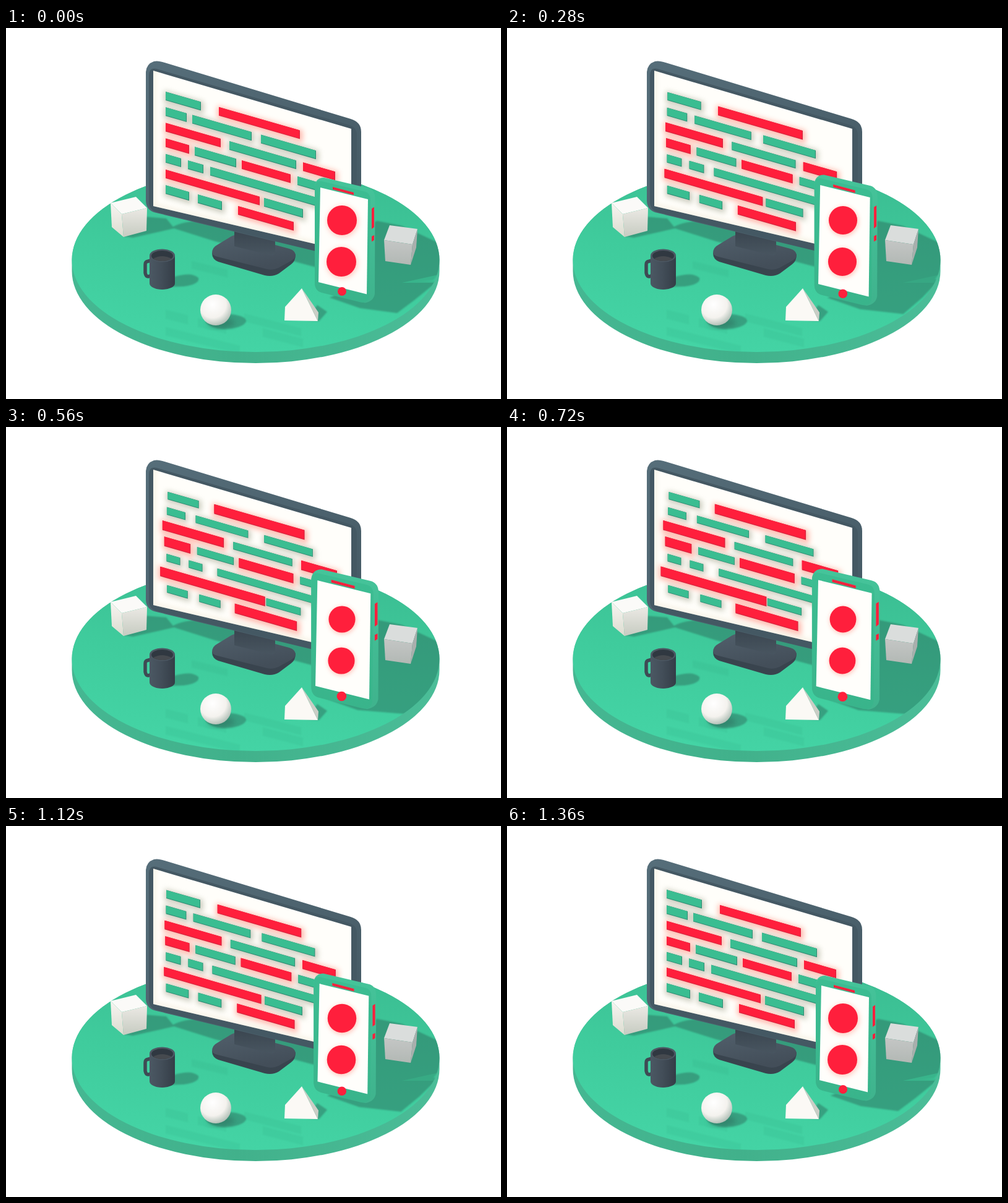
Recreate the animation shown at these times as an HTML page. Size 800 px wide and 600 px high, loop 1.4 s.

```html
<!DOCTYPE html>
<html lang="en">
<head>
<meta charset="utf-8">
<title>Desk with screen and phone</title>
<style>
html, body { margin: 0; width: 100%; height: 100%; overflow: hidden; background: #fff; }
svg { display: block; width: 100vw; height: 100vh; }
</style>
</head>
<body>
<svg viewBox="0 0 800 600" xmlns="http://www.w3.org/2000/svg">
  <defs>
    <linearGradient id="top" x1=".65" y1="0" x2=".4" y2="1">
      <stop offset="0" stop-color="#3bbd92"/><stop offset=".5" stop-color="#3fcb9c"/><stop offset="1" stop-color="#44d4a5"/>
    </linearGradient>
    <linearGradient id="rim">
      <stop offset="0" stop-color="#45b792"/><stop offset=".45" stop-color="#41b18b"/><stop offset="1" stop-color="#4bbd98"/>
    </linearGradient>
    <linearGradient id="shell" x1="0" y1="0" x2="1" y2="1">
      <stop offset="0" stop-color="#566e7a"/><stop offset="1" stop-color="#435762"/>
    </linearGradient>
    <linearGradient id="mug">
      <stop offset="0" stop-color="#4b5863"/><stop offset=".45" stop-color="#434e59"/><stop offset="1" stop-color="#343d47"/>
    </linearGradient>
    <linearGradient id="foot" x1="0" y1="0" x2=".4" y2="1">
      <stop offset="0" stop-color="#515f6b"/><stop offset="1" stop-color="#434e59"/>
    </linearGradient>
    <linearGradient id="neck" x1="0" y1="0" x2="0" y2="1">
      <stop offset="0" stop-color="#3a454f"/><stop offset="1" stop-color="#485560"/>
    </linearGradient>
    <linearGradient id="case" x1="0" y1="0" x2="0" y2="1">
      <stop offset="0" stop-color="#3cbd92"/><stop offset="1" stop-color="#39b48b"/>
    </linearGradient>
    <linearGradient id="side" x1="0" y1="0" x2="0" y2="1">
      <stop offset="0" stop-color="#45c49a"/><stop offset="1" stop-color="#3fb38d"/>
    </linearGradient>
    <linearGradient id="lit" x1="0" y1="0" x2="0" y2="1">
      <stop offset="0" stop-color="#f7f5f1"/><stop offset="1" stop-color="#dcdcd0"/>
    </linearGradient>
    <linearGradient id="face" x1="0" y1="0" x2="0" y2="1">
      <stop offset="0" stop-color="#ebe9e4"/><stop offset="1" stop-color="#c6cbc1"/>
    </linearGradient>
    <linearGradient id="dim" x1="0" y1="0" x2="0" y2="1">
      <stop offset="0" stop-color="#c4c6c5"/><stop offset="1" stop-color="#b2b8b4"/>
    </linearGradient>
    <radialGradient id="ball" cx=".4" cy=".32" r=".75">
      <stop offset="0" stop-color="#fff"/><stop offset=".58" stop-color="#f4f2ee"/><stop offset="1" stop-color="#a3b5ab"/>
    </radialGradient>
    <filter id="soft" x="-20%" y="-20%" width="140%" height="140%"><feGaussianBlur stdDeviation="4"/></filter>
    <filter id="fuzz" x="-20%" y="-20%" width="140%" height="140%"><feGaussianBlur stdDeviation="1"/></filter>
    <clipPath id="table"><ellipse cx="403.5" cy="375" rx="297" ry="149"/></clipPath>
    <clipPath id="glass"><path d="M238 69L558 163V363L238 288Z"/></clipPath>
  </defs>

  <path fill="url(#rim)" d="M106.500 375A297 149 0 0 1 700.500 375V393A297 149 0 0 1 106.500 393Z"/>
  <ellipse cx="403.5" cy="375" rx="297" ry="149" fill="url(#top)"/>

  <g clip-path="url(#table)">
    <g fill="#28916f" opacity=".09" filter="url(#fuzz)">
      <path d="M258 456l36 9v14l-36-9ZM258 484l120 30v13l-120-30ZM310 470l46 11v13l-46-11ZM385 462l92 24v12l-92-24ZM415 486l65 17v13l-65-17ZM300 377l58 14v12l-58-14Z"/>
    </g>
    <g fill="#2b5f52" opacity=".42" filter="url(#fuzz)">
      <path d="M222 305L259 308L272 324L205 339L190 337Z"/>
      <path d="M268 323Q280 314 310 312L372 322L500 352L600 312L640 320L700 348L710 385L690 408L640 412L597 405L505 388L430 368L338 345Z"/>
      <path id="cast"/>
      <path d="M258 419L273 402Q300 394 311 404Q314 414 287 418Z"/>
      <path d="M322 475Q340 462 365 463Q389 466 388 475Q382 486 352 487Q330 486 322 475Z"/>
      <path d="M486 473L503 448L519 459L506 474Z"/>
    </g>
    <path id="gap" fill="#3bc394" d="M640 412L703 398L700 412Z"/>
    <ellipse cx="348" cy="477" rx="22" ry="8" fill="#2b5f52" opacity=".4" filter="url(#soft)"/>
  </g>

  <!-- cubes -->
  <path fill="#fbfaf8" d="M169 283L210 273L228 291L187 301Z"/>
  <path fill="url(#lit)" d="M169 283L187 301L190 338L171 322Z"/>
  <path fill="url(#face)" d="M187 301L228 291L227 328L190 338Z"/>
  <path fill="#dadddc" d="M620 319L665 325L657 350L611 343Z"/>
  <path fill="url(#dim)" d="M611 343L657 350L654 383L613 377Z"/>
  <path fill="#a9afad" d="M657 350L665 325L663 355L654 383Z"/>

  <!-- stand and monitor -->
  <path fill="#39444e" d="M333 364Q333 374 343 378L418 400Q431 403 441 397L461 382Q468 377 468 366L400 352Z"/>
  <path fill="url(#foot)" d="M333 364Q333 355 341 351L364 337Q371 333 380 336L458 357Q468 360 468 368Q467 373 460 377L440 388Q430 393 418 389L342 370Q334 368 333 364Z"/>
  <path fill="url(#neck)" d="M369 327L435 343V365Q433 369 425 367L369 353Z"/>
  <path fill="url(#shell)" d="M226 71Q227 58 239 54Q245 52.500 253 55L557 147Q574 152 574 168V372Q572 379 563 376L241 298.500Q227 295 226 280Z"/>
  <path fill="#445863" d="M231 77Q231 63 243 66L555 157Q567 161 567 173V370Q566 376 557 374L244 298Q231 294 231 281Z"/>
  <path fill="#fffefa" d="M238 69L558 163V363L238 288Z"/>
  <g clip-path="url(#glass)">
    <path fill="none" stroke="#e8dcc0" stroke-width="6" opacity=".45" filter="url(#soft)" d="M250 60L238 69V288L558 363"/>
    <g id="glow" filter="url(#soft)" opacity=".5"></g>
    <g id="bars"></g>
  </g>

  <!-- mug -->
  <path fill="none" stroke="#3f4a54" stroke-width="5.500" stroke-linejoin="round" d="M234 376L227 378Q225 379 225 383V396Q226 402 230 402L235 400"/>
  <path fill="url(#mug)" d="M232 368V413A20.500 10 0 0 0 273 413V368Z"/>
  <ellipse cx="252.500" cy="368" rx="20.500" ry="10.500" fill="#4c5863"/>
  <ellipse cx="252.500" cy="368.500" rx="17.500" ry="8.500" fill="#303841"/>
  <path fill="#464a4f" d="M238 373Q252 365 268 373Q262 377 252 377Q243 377 238 373Z"/>

  <circle cx="339" cy="456" r="25" fill="url(#ball)"/>

  <path fill="#fbf9f5" d="M478 421L451 451L450 473L504 474Z"/>
  <path fill="#cbcec6" d="M478 421L505 460L504 474Z"/>

  <g id="phone">
    <path fill="url(#side)" d="M499 255Q501 242 514 242L584 258.500Q596 261 596.500 275L596 430Q594 442 580 444.500L510 427Q499 424 499 412Z"/>
    <path fill="url(#case)" d="M499 257Q500 245 511 248L580 264.500Q589 267 589 278L587.500 433Q586 446 573 443.500L510 428Q499 425 499 412Z"/>
    <path fill="#fffefb" d="M508 258L585 277L583 430.500L505 411Z"/>
    <path fill="#ff1f3c" d="M528 257L562 266V270L528 261Z"/>
    <path fill="none" stroke="#b93548" stroke-width="1" stroke-dasharray="2 3" d="M531 260L560 267.500"/>
    <path fill="#ff1f3c" d="M591 292L595 289.500V322L591 325ZM591 337L595 335V343L591 345.500Z"/>
    <circle cx="543" cy="426" r="7" fill="#ff1f3c"/>
  </g>
  <g id="badges"></g>
</svg>
<script>
const NS = "http://www.w3.org/2000/svg", STEP = 40, FRAMES = 35;
const RED = ["#ff1f3c", "#d3233f", "#ff7a66"], GREEN = ["#3abd91", "#2f8d74", "#9a9c84"];
const SLOPE = 0.288, GROW = 0.125;
const $ = id => document.getElementById(id);

function add(parent, tag, attrs) {
  const el = document.createElementNS(NS, tag);
  for (const k in attrs) el.setAttribute(k, attrs[k]);
  return parent.appendChild(el);
}

// [start, end, red?] per bar, one array per line of code
const rows = [
  [[258, 315], [344, 475, 1]],
  [[258, 292], [301, 397], [412, 501]],
  [[258, 347, 1], [361, 469], [480, 532, 1]],
  [[258, 296, 1], [305, 372], [381, 460, 1], [471, 547]],
  [[258, 283], [294, 319], [330, 530]],
  [[258, 410, 1], [417, 480]],
  [[258, 296], [310, 349], [375, 465, 1]]
];
const movers = [];
const shape = (w, h, dx, dy) => {
  const k = w * SLOPE / 2;
  return `M${-w / 2 + dx} ${-k - h / 2 + dy}L${w / 2 + dx} ${k - h / 2 + dy}v${h}L${-w / 2 + dx} ${-k + h / 2 + dy}Z`;
};

rows.forEach((row, i) => row.forEach(([a, b, red]) => {
  const [fill, edge, halo] = red ? RED : GREEN;
  const x = (a + b) / 2, y = 103 + i * 25.2 + (x - 258) * SLOPE + 7, w = b - a;
  const shade = add($("glow"), "path", { d: shape(w + 7, 20, 1, 2), fill: halo });
  const bar = add($("bars"), "g", {});
  add(bar, "path", { d: shape(w, 14, 0, 0), fill: edge });
  add(bar, "path", { d: shape(w - 1, 12.8, -0.5, -0.6), fill });
  for (const el of [shade, bar]) movers.push({ el, x, y, grow: red ? GROW : -GROW });
}));

for (const [x, y] of [[543, 311], [542, 378]]) {
  const g = add($("badges"), "g", {});
  add(g, "circle", { cx: 1, cy: 2, r: 25, fill: RED[2], opacity: 0.4, filter: "url(#soft)" });
  add(g, "circle", { r: 24, fill: RED[0] });
  movers.push({ el: g, x, y, grow: -0.11 });
}

// outline of the phone's shadow at its smallest and largest
const castA = [523, 436, 572, 453, 632, 461, 660, 440, 697, 410, 640, 409, 590, 400, 560, 420];
const castB = [509, 437, 568, 458, 655, 465, 690, 430, 704, 400, 640, 400, 590, 395, 550, 420];

function draw(ms) {
  const n = Math.floor(ms / STEP) % FRAMES;
  const p = (1 - Math.cos(2 * Math.PI * n / (FRAMES - 1))) / 2;
  for (const m of movers) m.el.setAttribute("transform", `translate(${m.x} ${m.y}) scale(${1 + m.grow * p})`);
  $("phone").setAttribute("transform", `translate(548 343.5) scale(${1 + GROW * p}) translate(-548 -343.5)`);
  $("cast").setAttribute("d", "M" + castA.map((v, i) => v + (castB[i] - v) * p).join(" ") + "Z");
  $("gap").setAttribute("opacity", Math.max(0, 0.6 - p));
}

let start;
function tick(now) {
  start ??= now;
  draw(now - start);
  requestAnimationFrame(tick);
}
draw(0);
requestAnimationFrame(tick);
</script>
</body>
</html>
```
